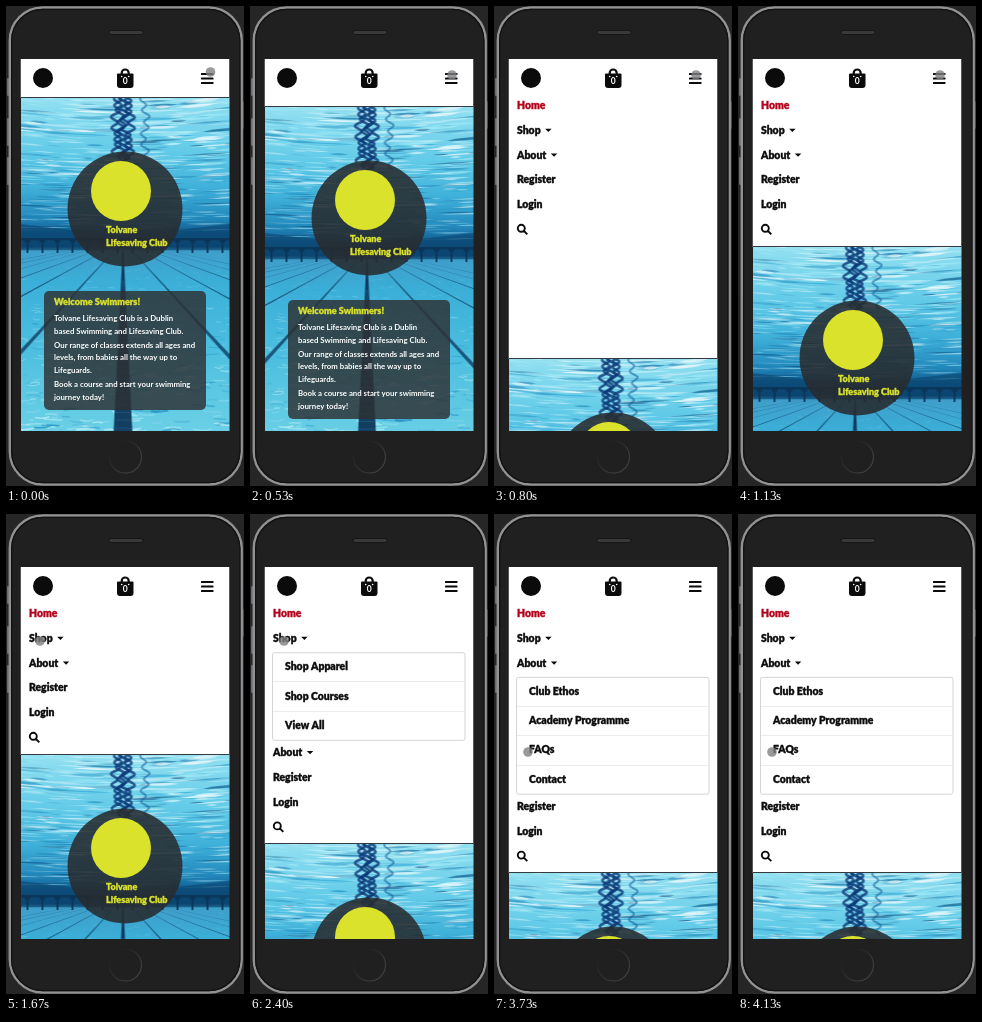
Animation, 238 px wide and 480 px high, one loop 4270 ms. Source, as an HTML page with a canvas:

```html
<!DOCTYPE html>
<html lang="en">
<head>
<meta charset="utf-8">
<title>Mobile menu</title>
<style>
html, body { margin: 0; width: 100%; height: 100%; overflow: hidden; background: #262626; }
canvas { display: block; width: 238px; height: 480px; }
</style>
</head>
<body>
<canvas id="stage"></canvas>
<script>
const W = 238, H = 480, LOOP = 4270, FPS = 15;
const SCREEN = { x: 14.5, y: 53, w: 209, h: 372 };
const NAV_CLOSED = 92, NAV_OPEN = 240.5, NAV_OVERSHOOT = 359, ROW = 24.7, SUBROW = 29.2;
const YELLOW = '#dbe22b', INK = '#0b0b0b';
const FONT = 'Lato, sans-serif';
const SUBMENUS = {
  Shop: ['Shop Apparel', 'Shop Courses', 'View All'],
  About: ['Club Ethos', 'Academy Programme', 'FAQs', 'Contact']
};
const ITEMS = ['Home', 'Shop', 'About', 'Register', 'Login'];

const canvas = document.getElementById('stage');
const scale = Math.max(1, window.devicePixelRatio || 1);
canvas.width = W * scale;
canvas.height = H * scale;
const ctx = canvas.getContext('2d');
ctx.scale(scale, scale);

const clamp = v => Math.min(1, Math.max(0, v));
const mix = (a, b, p) => a + (b - a) * p;
const sine = p => (1 - Math.cos(Math.PI * p)) / 2;
const cubic = p => p < 0.5 ? 4 * p ** 3 : 1 - (2 - 2 * p) ** 3 / 2;

// CSS "ease", solved by bisection
function ease(x) {
  let lo = 0, hi = 1;
  for (let i = 0; i < 20; i++) {
    const u = (lo + hi) / 2;
    if (0.75 * u * (1 - u) + u ** 3 < x) lo = u; else hi = u;
  }
  return 0.3 * lo * (1 - lo) ** 2 + 3 * lo * lo * (1 - lo) + lo ** 3;
}

function seeded(seed) {
  return () => (seed = (seed * 16807) % 2147483647) / 2147483647;
}

function rounded(c, x, y, w, h, r, fill, stroke, line = 1) {
  c.beginPath();
  c.roundRect(x, y, w, h, r);
  if (fill) { c.fillStyle = fill; c.fill(); }
  if (stroke) { c.strokeStyle = stroke; c.lineWidth = line; c.stroke(); }
}

function disc(c, x, y, r, fill) {
  c.beginPath();
  c.arc(x, y, r, 0, Math.PI * 2);
  c.fillStyle = fill;
  c.fill();
}

function poly(c, fill, ...pts) {
  c.beginPath();
  for (let i = 0; i < pts.length; i += 2) c.lineTo(pts[i], pts[i + 1]);
  c.closePath();
  c.fillStyle = fill;
  c.fill();
}

function gradient(c, x0, y0, x1, y1, stops) {
  const g = c.createLinearGradient(x0, y0, x1, y1);
  stops.forEach(([p, color]) => g.addColorStop(p, color));
  return g;
}

function label(text, x, y, size, color = INK, weight = 900) {
  ctx.font = `${weight} ${size}px ${FONT}`;
  ctx.fillStyle = color;
  ctx.fillText(text, x, y);
  return ctx.measureText(text).width;
}

// heavier lettering for the menu and headings
function heading(text, x, y, size, color = INK) {
  ctx.font = `900 ${size}px ${FONT}`;
  ctx.strokeStyle = color;
  ctx.lineWidth = 0.35;
  ctx.strokeText(text, x, y);
  return label(text, x, y, size, color);
}

// Underwater pool, drawn once; its origin is the top left of the hero
function paintPool() {
  const pool = document.createElement('canvas');
  const w = SCREEN.w, h = 334, cx = 102.5, vanish = 143, floor = 152;
  pool.width = w * scale;
  pool.height = h * scale;
  const c = pool.getContext('2d');
  c.scale(scale, scale);
  const rnd = seeded(77);
  const pick = list => list[Math.floor(rnd() * list.length)];

  c.fillStyle = gradient(c, 0, 0, 0, h, [
    [0, '#93e0f1'], [0.16, '#62cbe8'], [0.27, '#3fb0d9'], [0.36, '#2389bd'], [0.4, '#125f92'],
    [0.445, '#0f4f7d'], [0.46, '#3f9fca'], [0.55, '#3bafd8'], [0.75, '#4dbfe0'], [1, '#6bd0e6']
  ]);
  c.fillRect(0, 0, w, h);

  // surface ripples: lens-shaped streaks that flatten towards the horizon
  const light = ['#ffffff', '#d9f8fc', '#a4ebf7'], dark = ['#1c86b8', '#0f639a', '#2aa3d3', '#0c4b7c'];
  for (let i = 0; i < 480; i++) {
    const y = 134 * rnd(), near = 1 - y / 150, x = rnd() * w;
    const len = 5 + 22 * rnd(), thick = 0.5 + 3 * near * rnd();
    const tilt = (x - cx) / w * -len * 0.25 * near;
    const isLight = rnd() < 0.5 + 0.15 * near;
    c.globalAlpha = (isLight ? 0.3 : 0.22) + 0.4 * rnd();
    c.fillStyle = pick(isLight ? light : dark);
    c.beginPath();
    c.moveTo(x - len, y - tilt);
    c.quadraticCurveTo(x, y - thick, x + len, y + tilt);
    c.quadraticCurveTo(x + len * 0.2, y + thick, x - len, y - tilt);
    c.fill();
  }

  // rippling reflections of the centre lane and its neighbour
  const wiggle = (x0, depth, swing, line, color) => {
    const phase = rnd() * 6;
    c.strokeStyle = color;
    c.lineWidth = line;
    c.beginPath();
    for (let y = 0; y <= depth; y++)
      c.lineTo(x0 + swing * Math.sin(y * 0.55 + phase) + 2 * Math.sin(y * 0.17 + phase), y);
    c.stroke();
  };
  c.globalAlpha = 0.8;
  for (let i = 0; i < 5; i++) wiggle(cx - 7 + i * 3.5, 46 + rnd() * 30, 3.5, 2.6, pick(['#0c3a78', '#124f93']));
  c.globalAlpha = 0.6;
  wiggle(cx + 22, 62, 3, 2, '#15629c');

  // end wall with hanging posts
  c.globalAlpha = 0.45;
  poly(c, '#07395f', 0, 126, cx, 138, w, 126, w, 152, 0, 152);
  c.globalAlpha = 0.9;
  c.fillStyle = '#0a3557';
  c.fillRect(0, 140, w, 2.5);
  for (let x = 6; x < w; x += 15) {
    c.fillRect(x - 2, 141, 6, 3.5);
    c.fillRect(x, 142, 2, 13);
  }

  // light on the floor
  for (let i = 0; i < 420; i++) {
    const p = rnd(), y = floor + 4 + p * 180, len = 2 + 9 * p * rnd(), x = rnd() * w;
    c.globalAlpha = 0.15 + 0.6 * p * rnd();
    c.strokeStyle = rnd() < 0.68 ? '#c9f5fa' : '#1f8dbd';
    c.lineWidth = 0.5 + 1.1 * p;
    c.beginPath();
    c.moveTo(x - len, y);
    c.quadraticCurveTo(x, y + (rnd() - 0.5) * 6, x + len, y + (rnd() - 0.5) * 3);
    c.stroke();
  }

  // lane lines in perspective
  const lane = (slope, half, color) => {
    const a = floor - vanish, b = h - vanish;
    poly(c, color, cx + (slope - half) * a, floor, cx + (slope + half) * a, floor,
      cx + (slope + half) * b, h, cx + (slope - half) * b, h);
  };
  c.globalAlpha = 0.8;
  for (let n = -6; n <= 6; n++) if (n) lane(n * 0.92, 0.022, '#0d3f66');
  c.globalAlpha = 0.92;
  lane(0, 0.049, '#0b3257');
  c.globalAlpha = 0.35;
  c.fillStyle = '#3f8fbd';
  for (let d = 40; d < h - vanish; d *= 1.045) c.fillRect(cx - d * 0.045, vanish + d, d * 0.09, 0.7);
  return pool;
}

const pool = paintPool();

function drawHero(top) {
  ctx.drawImage(pool, SCREEN.x, top, SCREEN.w, 334);
  ctx.save();
  ctx.translate(0, top - NAV_CLOSED);
  disc(ctx, 119, 203, 57.5, 'rgba(40,43,46,.87)');
  disc(ctx, 115, 185, 30, YELLOW);
  heading('Tolvane', 100, 224, 9, YELLOW);
  heading('Lifesaving Club', 100, 237, 9, YELLOW);

  rounded(ctx, 38, 285, 162, 119, 5, 'rgba(46,48,50,.82)');
  heading('Welcome Swimmers!', 48, 296, 9.1, YELLOW);
  [
    ['Tolvane Lifesaving Club is a Dublin', 313],
    ['based Swimming and Lifesaving Club.', 325.3],
    ['Our range of classes extends all ages and', 339.8],
    ['levels, from babies all the way up to', 352.1],
    ['Lifeguards.', 364.5],
    ['Book a course and start your swimming', 379],
    ['journey today!', 391.5]
  ].forEach(([line, y]) => label(line, 48, y, 7.8, '#fff', 700));
  ctx.restore();
}

function drawSubmenu(list, top) {
  rounded(ctx, 22.5, top + 0.5, 192.5, list.length * SUBROW, 2, '#fff', '#d4d4d4');
  list.forEach((name, i) => {
    if (i) {
      ctx.fillStyle = '#ececec';
      ctx.fillRect(23, Math.round(top + i * SUBROW), 191, 1);
    }
    heading(name, 35, top + 15 + i * SUBROW, 10.4);
  });
}

function drawMenu(bottom, openItem) {
  ctx.save();
  ctx.beginPath();
  ctx.rect(SCREEN.x, 84, SCREEN.w, Math.max(0, bottom - 92));
  ctx.clip();
  let y = 100;
  for (const name of ITEMS) {
    const end = 23 + heading(name, 23, y, 10.4, name === 'Home' ? '#b3001b' : INK);
    const list = SUBMENUS[name];
    if (list) poly(ctx, INK, end + 4.5, y - 2, end + 11, y - 2, end + 7.75, y + 1.3);
    if (name === openItem) {
      drawSubmenu(list, y + 13.5);
      y += list.length * SUBROW + 2;
    }
    y += ROW;
  }
  ctx.strokeStyle = INK;
  ctx.lineWidth = 1.9;
  ctx.beginPath();
  ctx.arc(27.3, y - 1.2, 3.5, 0, Math.PI * 2);
  ctx.moveTo(30, y + 1.5);
  ctx.lineTo(33.3, y + 4.8);
  ctx.stroke();
  ctx.restore();
}

function drawHeader() {
  disc(ctx, 37, 72, 10, INK);
  rounded(ctx, 111, 67.5, 16.5, 14.5, [1, 1, 3, 3], INK);
  ctx.strokeStyle = INK;
  ctx.lineWidth = 2.2;
  ctx.beginPath();
  ctx.moveTo(115.7, 70);
  ctx.lineTo(115.7, 67);
  ctx.arc(119.2, 67, 3.5, Math.PI, 0);
  ctx.lineTo(122.7, 70);
  ctx.stroke();
  disc(ctx, 115.7, 70.5, 0.8, '#fff');
  disc(ctx, 122.7, 70.5, 0.8, '#fff');
  ctx.textAlign = 'center';
  label('0', 119.2, 75.8, 8.5, '#fff', 700);
  ctx.textAlign = 'left';
  for (const y of [67, 71.5, 76]) rounded(ctx, 195, y, 12.5, 2, 0.6, INK);
}

function drawPhone() {
  ctx.fillStyle = '#262626';
  ctx.fillRect(0, 0, W, H);
  for (const [x, y, h] of [[1, 72, 18], [1, 112, 28], [1, 151, 28], [235.5, 95, 28]])
    rounded(ctx, x, y, 2, h, 1, '#6c6c6e');
  rounded(ctx, 3.8, 1.5, 231.9, 477, 33, '#202021', '#929294', 2.4);
  rounded(ctx, 5.6, 3.3, 228.3, 473.4, 31.5, null, '#111112', 1.2);
  rounded(ctx, 103, 24.5, 34, 4, 2, '#39393b', '#111', 0.8);
  ctx.beginPath();
  ctx.arc(119.5, 451, 16, 0, Math.PI * 2);
  ctx.strokeStyle = gradient(ctx, 104, 436, 135, 467, [[0, '#19191a'], [1, '#48484a']]);
  ctx.lineWidth = 1.2;
  ctx.stroke();
}

function navBottom(t) {
  if (t < 516) return NAV_CLOSED;
  if (t < 925) return mix(NAV_CLOSED, NAV_OVERSHOOT, ease(clamp((t - 516) / 350)));
  return NAV_OPEN;
}

function cursorAt(t) {
  const moves = [
    [0, 333, 202, 69, sine],
    [1420, 1667, 34, 127, cubic],
    [3057, 3400, 34, 238, sine]
  ];
  let x = 204.5, y = 66;
  for (const [from, to, tx, ty, curve] of moves) {
    const p = curve(clamp((t - from) / (to - from)));
    x = mix(x, tx, p);
    y = mix(y, ty, p);
  }
  return [x, y];
}

function draw(t) {
  const openItem = t >= 3725 ? 'About' : t >= 2060 ? 'Shop' : '';
  const extra = openItem ? SUBMENUS[openItem].length * SUBROW + 2 : 0;
  const bottom = Math.round(navBottom(t) + extra);

  drawPhone();
  ctx.save();
  ctx.beginPath();
  ctx.rect(SCREEN.x, SCREEN.y, SCREEN.w, SCREEN.h);
  ctx.clip();
  ctx.textBaseline = 'middle';
  ctx.lineJoin = 'round';
  drawHero(bottom);
  ctx.fillStyle = '#fff';
  ctx.fillRect(SCREEN.x, SCREEN.y, SCREEN.w, bottom - SCREEN.y);
  ctx.fillStyle = '#343a40';
  ctx.fillRect(SCREEN.x, bottom - 1, SCREEN.w, 1);
  drawMenu(bottom, openItem);
  drawHeader();
  disc(ctx, ...cursorAt(t), 4.8, 'rgba(128,128,130,.8)');
  ctx.restore();
}

const start = performance.now();
function tick() {
  const t = (performance.now() - start) % LOOP;
  draw(Math.floor((t + 4) * FPS / 1000) * 1000 / FPS);
  requestAnimationFrame(tick);
}
tick();
</script>
</body>
</html>
```
